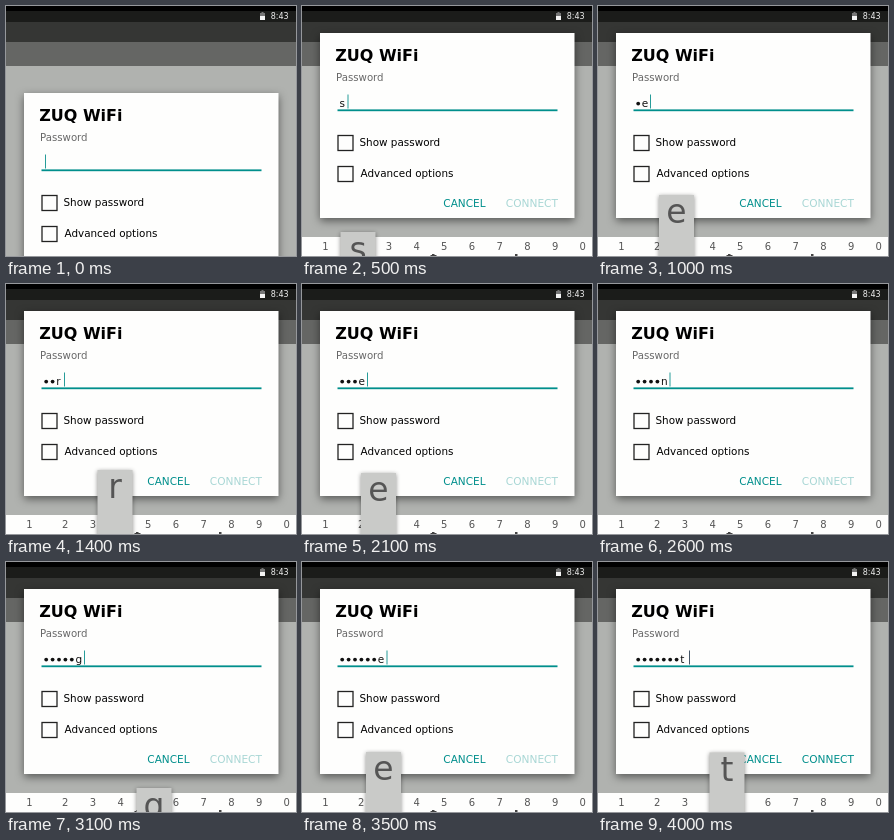
These frames come from a looping animation (290 by 250 pixels, 4.7 s). An HTML page:

```html
<!DOCTYPE html>
<html lang="en">
<head>
<meta charset="utf-8">
<title>Wi-Fi password</title>
<style>
  html, body { margin: 0; width: 100%; height: 100%; overflow: hidden; background: #b0b2af; }
  svg { display: block; width: 290px; height: 250px; font: 10.4px "DejaVu Sans", sans-serif; }
  .panel { fill: #fefefd; filter: drop-shadow(0 3px 4px rgba(0, 0, 0, .5)); }
  .box { fill: none; stroke: #222; stroke-width: 1.3; }
  .teal { fill: #008f8c; }
  .digits { font-size: 10px; fill: #555; text-anchor: middle; }
  .key { font-size: 33px; fill: #555; text-anchor: middle; }
  .card { fill: #c9cac8; filter: drop-shadow(0 1px 2px rgba(0, 0, 0, .45)); }
</style>
</head>
<body>
<svg viewBox="0 0 290 250">
  <rect width="290" height="250" fill="#b0b2af"/>
  <rect y="36" width="290" height="24" fill="#656664"/>
  <rect y="16" width="290" height="20" fill="#353634"/>
  <rect y="5" width="290" height="11" fill="#1b1c1a"/>
  <rect width="290" height="5" fill="#000"/>
  <path d="M255.5 6h2v1h1.5v3.5h-5V7h1.5z" fill="#777"/>
  <rect x="254" y="10" width="5" height="4" fill="#f4f4f4"/>
  <text x="264.7" y="13.4" font-size="8" fill="#f0f0f0">8:43</text>

  <g id="dialog">
    <rect class="panel" x="18" y="27" width="254.5" height="185"/>
    <text x="33.2" y="55" font-size="16" font-weight="bold">ZUQ WiFi</text>
    <text x="34" y="75" font-size="10.2" fill="#686868">Password</text>
    <rect class="teal" x="35.5" y="103.4" width="220" height="1.8"/>
    <g id="bullets" fill="#111"></g>
    <text id="letter" y="101" font-size="10.5" fill="#111"></text>
    <rect id="cursor" y="88.5" width="1" height="14"/>
    <rect class="box" x="36" y="129.5" width="15" height="15"/>
    <text x="57.5" y="140">Show password</text>
    <rect class="box" x="36" y="160.5" width="15" height="15"/>
    <text x="58.5" y="171">Advanced options</text>
    <text class="teal" x="141.3" y="201" font-size="10.5">CANCEL</text>
    <text id="connect" x="203.8" y="201" font-size="10.6">CONNECT</text>
  </g>

  <g id="keyboard">
    <rect y="231" width="290" height="19" fill="#fefefd"/>
    <g id="digits" class="digits"></g>
    <path d="M130 248h2.5v1h2v1h-6v-1h1.5zM213 248h2.5v2h-2.5z" fill="#444"/>
  </g>
  <g id="popup">
    <rect id="card" class="card" width="35" height="66"/>
    <text id="key" class="key"></text>
  </g>
</svg>
<script>
const LOOP = 4700, PITCH = 6.4;

// Letter typed, cursor x, popup corner and letter baseline.
const steps = [
  { at: 0, cursor: 39 },
  { at: 500, letter: "s", cursor: 45.5, popup: [38.5, 226, 255] },
  { at: 1000, letter: "e", cursor: 52, popup: [61, 189, 217] },
  { at: 1400, letter: "r", cursor: 58, popup: [91.5, 186, 214] },
  { at: 2100, letter: "e", cursor: 65, popup: [59, 189, 217] },
  { at: 2600, letter: "n", cursor: 71.5 },
  { at: 3100, letter: "g", cursor: 78, popup: [130.5, 226, 255] },
  { at: 3500, letter: "e", cursor: 84.5, popup: [64, 190, 218] },
  { at: 4000, letter: "t", cursor: 91, popup: [111.5, 190.5, 219] }
];

const $ = id => document.getElementById(id);
const set = (el, attrs) => {
  for (const name in attrs) el.setAttribute(name, attrs[name]);
  return el;
};
const add = (parent, tag, attrs) =>
  set(parent.appendChild(document.createElementNS("http://www.w3.org/2000/svg", tag)), attrs);
const show = (el, visible) => set(el, { visibility: visible ? "visible" : "hidden" });

[..."1234567890"].forEach((digit, i) => {
  add($("digits"), "text", { x: i ? 31.5 + 27.7 * i : 23.5, y: 244 }).textContent = digit;
});
const bullets = steps.slice(2).map((_, i) =>
  add($("bullets"), "circle", { cx: 40.2 + PITCH * i, cy: 97.6, r: 1.9 }));

function draw(index) {
  const { letter, cursor, popup } = steps[index];
  const last = index === steps.length - 1;
  set($("dialog"), { transform: `translate(0 ${index ? 0 : 60})` });
  show($("keyboard"), index > 0);
  bullets.forEach((bullet, i) => show(bullet, i < index - 1));
  $("letter").textContent = letter || "";
  set($("letter"), { x: 37.4 + PITCH * (index - 1) });
  set($("cursor"), { x: cursor, fill: last ? "#456" : "#279c99" });
  set($("connect"), { fill: last ? "#008f8c" : "#a9d7d5" });
  show($("popup"), popup);
  if (popup) {
    const [x, y, baseline] = popup;
    set($("card"), { x, y });
    set($("key"), { x: x + 17.5, y: baseline });
    $("key").textContent = letter;
  }
}

const start = performance.now();
let current = -1;
function tick() {
  const time = (performance.now() - start) % LOOP;
  const index = steps.findLastIndex(step => step.at <= time);
  if (index !== current) draw(current = index);
  requestAnimationFrame(tick);
}
tick();
</script>
</body>
</html>
```
